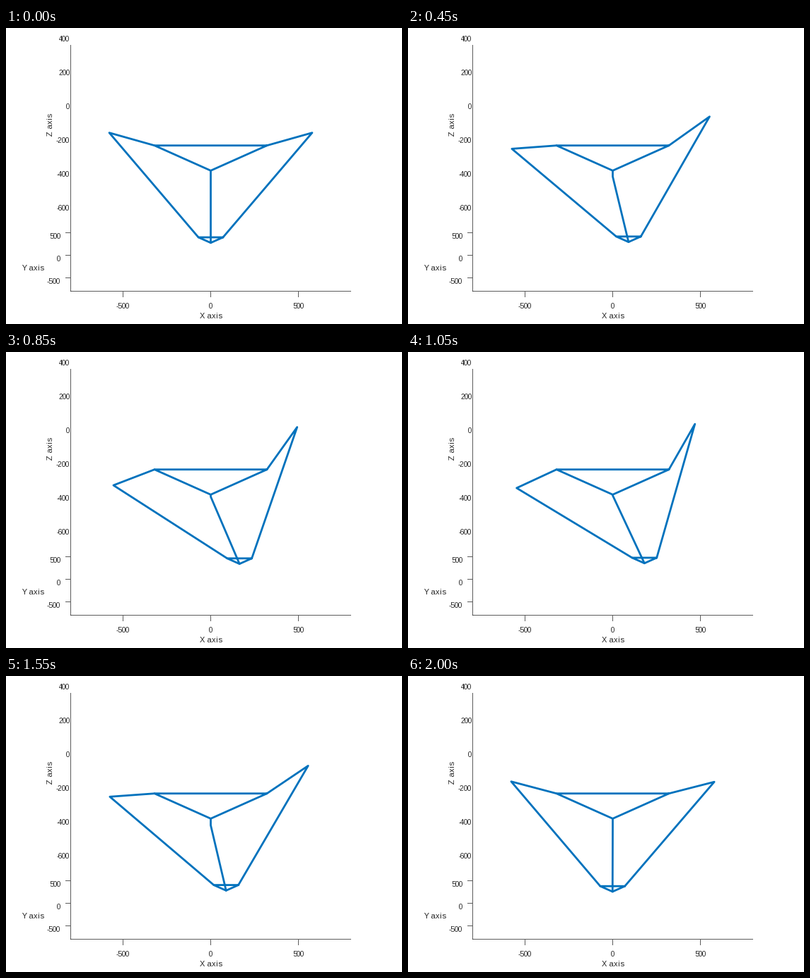
A matplotlib script that plays this animation: 560 by 420 pixels, repeating every 2.05 s.

```python
import numpy as np
import matplotlib.pyplot as plt
from matplotlib.animation import FuncAnimation

W, H, DPI = 560, 420, 100
FRAMES, STEP = 41, 50
PX = 72 / DPI                      # one pixel in points
BLUE, DARK = "#0072BD", "#262626"

# Delta robot geometry
BASE_R, PLAT_R = 370, 81
UPPER, LOWER = 300, 798
ANGLES = np.radians([30, 150, 270])

# Orthographic view, 15 degrees of elevation
SCALE = 0.248
SX, SY, SZ = SCALE, SCALE * np.sin(np.radians(15)), SCALE * np.cos(np.radians(15))
CX, CY = 289.5, 178.6

plt.rcParams["font.family"] = "Liberation Sans"
plt.rcParams["text.hinting_factor"] = 1    # whole-pixel letter advances
fig = plt.figure(figsize=(W / DPI, H / DPI), dpi=DPI, facecolor="white")
ax = fig.add_axes([0, 0, 1, 1])
ax.set_xlim(0, W)
ax.set_ylim(H, 0)
ax.axis("off")


def project(points):
    x, y, z = np.asarray(points, float).T
    return CX + SX * x, CY - SY * y - SZ * z


def ring(radius, center=(0, 0, 0)):
    flat = [radius * np.cos(ANGLES), radius * np.sin(ANGLES), 0 * ANGLES]
    return np.array(flat).T + center


def elbow(a, tip):
    """Inverse kinematics of the arm at azimuth a."""
    out = np.array([np.cos(a), np.sin(a), 0])
    r = tip @ out - BASE_R
    t = tip[1] * out[0] - tip[0] * out[1]
    z = tip[2]
    k = (r * r + t * t + z * z + UPPER**2 - LOWER**2) / (2 * UPPER)
    q = np.arctan2(z, r) + np.arccos(np.clip(k / np.hypot(r, z), -1, 1))
    return out * (BASE_R + UPPER * np.cos(q)) + [0, 0, UPPER * np.sin(q)]


def platform_center(n):
    """Swing to the right and back, with a slight downward drift."""
    if n <= 20:
        x = 10.45 * n - 0.047 * n * n
    else:
        m = 40 - n
        x = 10.1 * m - 0.028 * m * m - 1
    y = -x * x / 1100
    drop = -121 + 1.74e-4 * x * x - 1.2 * n / 40
    return np.array([x, y, (drop - SY * y) / SZ])


def rule(x, y):
    ax.plot(x, y, color=DARK, lw=0.75 * PX, solid_capstyle="butt", snap=False)


def label(x, y, s, ha="center", size=10, rot=0):
    ax.text(x, y, s, ha=ha, va="baseline", color=DARK, fontsize=size * PX,
            rotation=rot, rotation_mode="anchor")


def draw_axes():
    rule([91.5, 91.5], [24, 374])
    rule([91, 488], [373.5, 373.5])
    for i, v in enumerate((-500, 0, 500)):
        x = 165.5 + 124 * i
        rule([x, x], [374, 382])
        label(x, 398, str(v))
        y = 354.5 - 32 * i
        rule([84, 91], [y, y])
        label(77, y + 8.5, str(v), "right")
    for i, v in enumerate(range(400, -601, -200)):
        label(90, 18.6 + 48 * i, str(v), "right")
    label(290.3, 412, "X axis", size=10.8)
    label(38.3, 344, "Y axis", size=10.8)
    label(66, 137.5, "Z axis", size=10.8, rot=90)


def bar():
    return ax.plot([], [], color=BLUE, lw=2.8 * PX, solid_capstyle="round",
                   solid_joinstyle="round", snap=False)[0]


draw_axes()
base = ring(BASE_R)
base_line, plat_line = bar(), bar()
arm_lines = [bar() for _ in ANGLES]
base_line.set_data(*project(base[[0, 1, 2, 0]]))


def update(n):
    tips = ring(PLAT_R, platform_center(n))
    plat_line.set_data(*project(tips[[0, 1, 2, 0]]))
    for line, a, shoulder, tip in zip(arm_lines, ANGLES, base, tips):
        line.set_data(*project([shoulder, elbow(a, tip), tip]))
    return [plat_line, *arm_lines]


anim = FuncAnimation(fig, update, frames=FRAMES, interval=STEP,
                     repeat=True, repeat_delay=0, blit=False)
plt.show()
```
